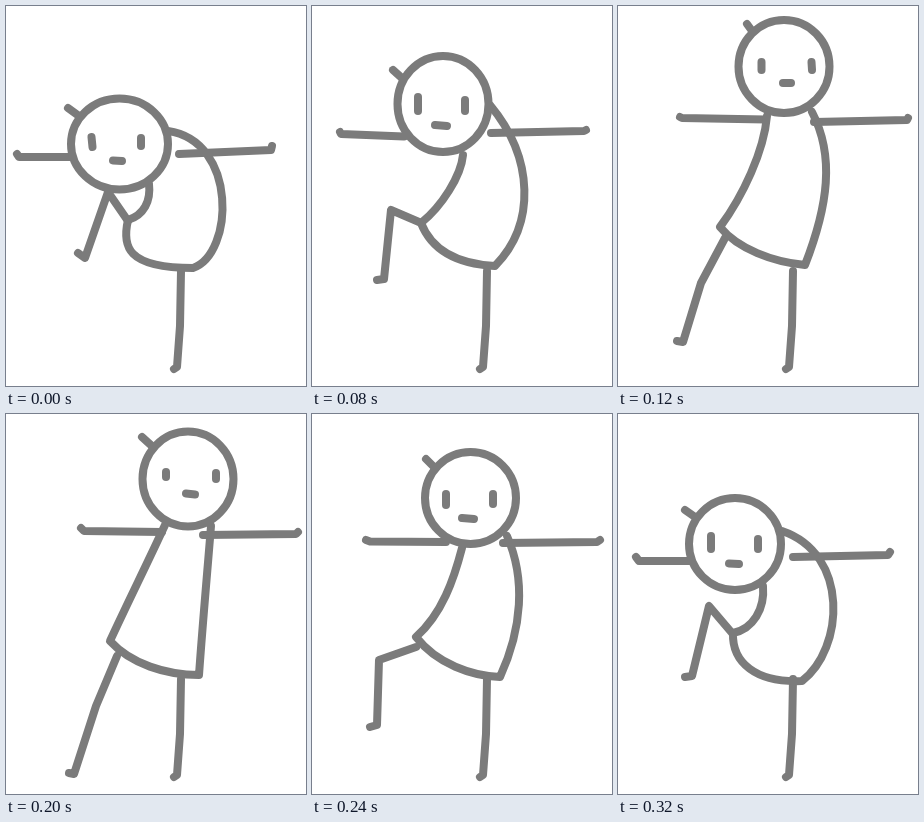
Animation of 300x380 px, one loop 0.36 s. Source, as an HTML page with a canvas:

```html
<!DOCTYPE html>
<html lang="en">
<head>
<meta charset="utf-8">
<title>Swinging stick figure</title>
<style>
html, body { margin: 0; width: 100%; height: 100%; overflow: hidden; background: #fff; }
canvas { display: block; }
</style>
</head>
<body>
<canvas id="stage" width="300" height="380"></canvas>
<script>
const ctx = document.getElementById('stage').getContext('2d');
const STEP_MS = 40, STEPS = 9;

// head: centre and radii; dress: neck, then three cubic curves (side, hem, back);
// every other part is a polyline of x, y pairs.
const poses = [
  {
    head: [113.5, 138, 48.5, 45.5], tuft: [62, 102, 73, 110],
    leftEye: [85.5, 131, 86.5, 141], rightEye: [135, 132, 135, 140], mouth: [107, 154.5, 116, 155],
    leftArm: [11, 148, 13, 151, 64, 151], rightArm: [173, 148, 265, 144, 266, 140],
    dress: [143, 178, 145, 195, 138, 209, 122, 214, 116, 240, 120, 262, 187, 262, 228, 248, 232, 135, 162, 125],
    leg: [122, 215, 102, 186, 79, 252, 72, 247]
  },
  {
    head: [131, 98, 45.5, 48], tuft: [81, 64, 91, 73],
    leftEye: [106, 91, 106, 105], rightEye: [153, 94, 153, 105], mouth: [123, 119, 135, 120],
    leftArm: [28, 126, 29, 128, 92, 130.5], rightArm: [179, 127, 272, 125, 274, 124],
    dress: [151, 149, 149, 170, 130, 200, 109, 217, 120, 245, 145, 258, 183, 260, 224, 218, 222, 152, 178, 99],
    leg: [107, 216, 79, 204, 72, 273, 65, 274]
  },
  {
    head: [166, 60.5, 45.5, 46.5], tuft: [129, 18, 137, 29],
    leftEye: [143.5, 56, 143.5, 64], rightEye: [193.5, 56, 194, 64], mouth: [165, 77, 173, 77],
    leftArm: [62, 111, 64, 112, 148, 113.5], rightArm: [196, 116, 289, 114, 290, 112],
    dress: [149, 110, 146, 145, 125, 190, 102, 221, 120, 243, 155, 256, 187, 259, 210, 200, 217, 150, 194, 106],
    leg: [107, 232, 83, 277, 65, 336, 59, 335]
  },
  {
    head: [182, 65, 45.5, 47.5], tuft: [136, 23, 147, 33],
    leftEye: [160, 58, 160, 63], rightEye: [210, 59, 210, 65], mouth: [180, 79.5, 189, 80.5],
    leftArm: [75, 114, 78, 117, 156, 118], rightArm: [197, 121, 290, 120, 292, 118],
    dress: [159, 111, 141, 150, 122, 188, 104, 227, 125, 250, 160, 261, 193, 261, 197, 205, 202, 150, 205, 112],
    leg: [111, 242, 90, 292, 68, 360, 63, 359]
  },
  {
    head: [158.5, 84, 45.5, 46], tuft: [114, 45, 124, 55],
    leftEye: [134, 80, 134, 91], rightEye: [181, 80, 181, 90], mouth: [150, 104, 162, 105],
    leftArm: [54, 126, 58, 127.5, 134, 128], rightArm: [191, 129, 285, 128, 288, 126],
    dress: [150, 134, 142, 165, 130, 200, 104, 223, 125, 250, 160, 262, 188, 263, 210, 215, 214, 165, 195, 122],
    leg: [104, 233, 67, 246, 65, 311, 58, 313]
  },
  {
    head: [117, 130, 46, 46], tuft: [67, 96, 77, 103],
    leftEye: [93, 122, 93, 135], rightEye: [140, 125, 140, 135], mouth: [111, 149.5, 121, 150],
    leftArm: [18, 143, 21, 147, 72, 147], rightArm: [175, 143, 270, 141, 272, 138],
    dress: [145, 172, 147, 195, 135, 215, 115, 219, 114, 248, 137, 269, 184, 267, 226, 235, 232, 140, 164, 117],
    leg: [114, 219, 91, 192, 74, 262, 67, 263]
  }
];
const standingLeg = [175, 265, 174, 320, 171, 361, 168, 363];

// Smooth in-between of poses a and a + 1, taking their outer neighbours into account.
function between(a) {
  const [before, from, to, after] = [a + 5, a, a + 1, a + 2].map(i => poses[i % 6]);
  const mixed = {};
  for (const part in from) {
    mixed[part] = from[part].map((v, i) =>
      0.63 * (v + to[part][i]) - 0.13 * (before[part][i] + after[part][i]));
  }
  return mixed;
}

// Each group of three steps is: pose, in-between, pose.
function poseAt(step) {
  const first = 2 * Math.floor(step / 3);
  return [poses[first], between(first), poses[first + 1]][step % 3];
}

function line(points) {
  ctx.beginPath();
  for (let i = 0; i < points.length; i += 2) ctx.lineTo(points[i], points[i + 1]);
  ctx.stroke();
}

function drawDress(points) {
  ctx.beginPath();
  ctx.moveTo(points[0], points[1]);
  for (let i = 2; i < points.length; i += 6) ctx.bezierCurveTo(...points.slice(i, i + 6));
  ctx.stroke();
}

function drawHead([x, y, rx, ry]) {
  ctx.beginPath();
  ctx.ellipse(x, y, rx, ry, 0, 0, 2 * Math.PI);
  ctx.fill();
  ctx.stroke();
}

function draw() {
  const pose = poseAt(Math.floor(performance.now() / STEP_MS) % STEPS);
  ctx.fillStyle = '#fff';
  ctx.fillRect(0, 0, 300, 380);
  ctx.strokeStyle = '#7b7b7b';
  ctx.lineWidth = 8;
  ctx.lineCap = ctx.lineJoin = 'round';
  [standingLeg, pose.leg, pose.leftArm, pose.tuft].forEach(line);
  drawDress(pose.dress);
  drawHead(pose.head);
  [pose.rightArm, pose.leftEye, pose.rightEye, pose.mouth].forEach(line);
  requestAnimationFrame(draw);
}
draw();
</script>
</body>
</html>
```
